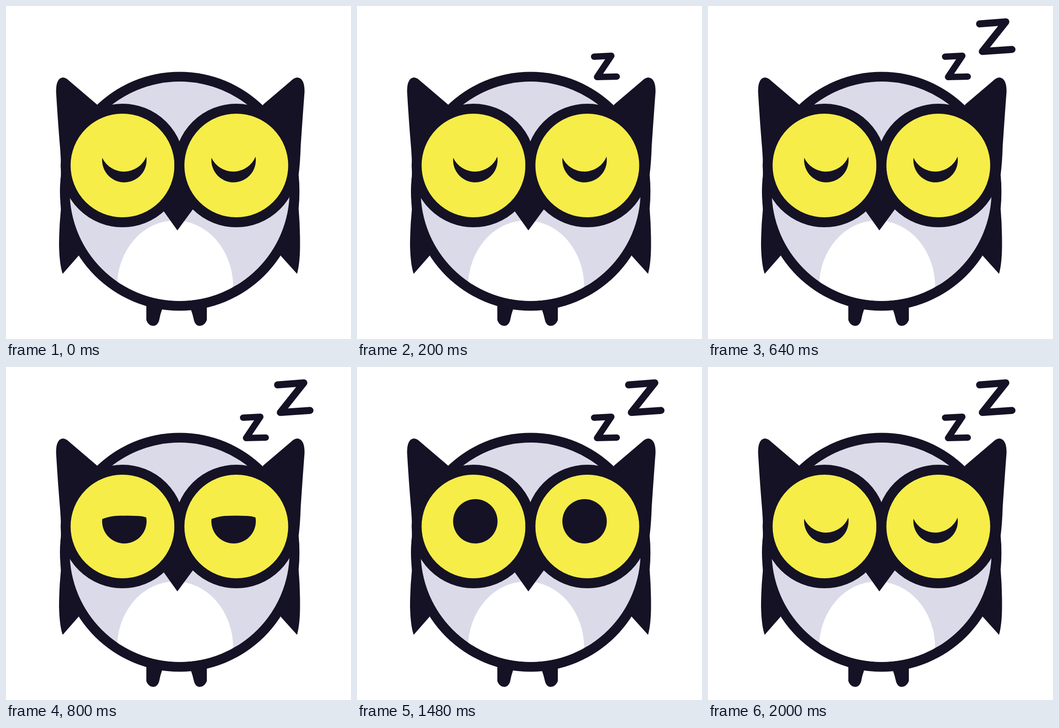
An HTML page for the animation above (2050 ms loop, 761x736 px).

```html
<!DOCTYPE html>
<html lang="en">
<head>
<meta charset="utf-8">
<title>Sleepy owl</title>
<style>
  html, body { margin: 0; width: 100%; height: 100%; overflow: hidden; background: #fff; }
  svg { display: block; width: 761px; height: 736px; }
  .ink { fill: #151225; }
  .eye { fill: #f6ed48; stroke: #151225; stroke-width: 22; }
  .z { fill: none; stroke: #151225; stroke-linecap: round; stroke-linejoin: round; }
</style>
</head>
<body>
<svg viewBox="0 0 761 736">
  <defs>
    <clipPath id="inside"><circle cx="383" cy="409.5" r="242.5"/></clipPath>
  </defs>

  <!-- ears and wings -->
  <path class="ink" d="M201 218 L139 165 Q132 158 125 158 Q110 160 110.500 190 Q114 250 119 310
    Q122 345 121 375 Q118 410 121 450 Q117 490 117 530 Q118 572 125 592 L160 552 L240 400 Z"/>
  <path class="ink" d="M567 218 L628 166 Q636 158 643 158 Q659 160 658.500 190 Q654 250 650 310
    Q649 345 645.500 373 Q649 410 645.500 448 Q649 490 648.500 535 Q648 570 642 592 L606 552 L526 400 Z"/>

  <!-- feet -->
  <path class="ink" d="M309.500 650 V694 Q314 707 326 707 Q334 706 337.500 696 Q340 682 345 668 V650 Z"/>
  <path class="ink" d="M443 650 V694 Q438 707 426 707 Q418 706 415 696 Q412 682 407 668 V650 Z"/>

  <!-- body -->
  <circle class="ink" cx="383" cy="409.5" r="264"/>
  <g clip-path="url(#inside)">
    <rect x="130" y="160" width="510" height="500" fill="#dbdae8"/>
    <ellipse cx="373" cy="620" rx="128" ry="146" fill="#fff"/>
    <path class="ink" d="M382 390 L346 451 L378 496 L414 447 Z"/>
  </g>

  <!-- eyes -->
  <circle class="eye" cx="257" cy="352.5" r="125.5"/>
  <circle class="eye" cx="508" cy="352.5" r="125.5"/>
  <path class="ink pupil"/>
  <path class="ink pupil" transform="translate(241 0)"/>

  <path id="small" class="z" stroke-width="14" d="M523 112 L561 110 L529.500 157 L573 156"/>
  <path id="large" class="z" stroke-width="15.5" d="M599 39.500 L657 35 L605 100.500 L670.500 96"/>
</svg>
<script>
  const LOOP = 2050;
  const rim = 'A49 49 0 1 1';
  const pupil = {
    shut: `M212.3 335.5 A53 53 0 0 0 309.4 333 ${rim.replace('1 1', '0 1').replace('0 0 1', '0 1 1')} 212.3 335.5 Z`,
    half: `M212.3 336 Q225 331 240 329.3 Q275 327.300 300 330 Q306 331 309.3 332.5 ${rim} 212.3 336 Z`,
    open: `M212 341 ${rim} 310 341 ${rim} 212 341 Z`
  };

  // start time, eyelids, number of Zs
  const steps = [
    [0, 'shut', 0],
    [200, 'shut', 1],
    [400, 'shut', 2],
    [800, 'half', 2],
    [1000, 'open', 2],
    [1800, 'half', 2],
    [2000, 'shut', 2]
  ];

  const pupils = document.querySelectorAll('.pupil');
  const zs = document.querySelectorAll('.z');
  let current;

  function draw(now) {
    const t = now % LOOP;
    const step = steps.findLast(([start]) => start <= t);
    if (step !== current) {
      current = step;
      const [, lids, count] = step;
      pupils.forEach(p => p.setAttribute('d', pupil[lids]));
      zs.forEach((z, i) => z.setAttribute('visibility', i < count ? 'visible' : 'hidden'));
    }
  }

  const begin = performance.now();
  function tick() {
    draw(performance.now() - begin);
    requestAnimationFrame(tick);
  }
  tick();
</script>
</body>
</html>
```
